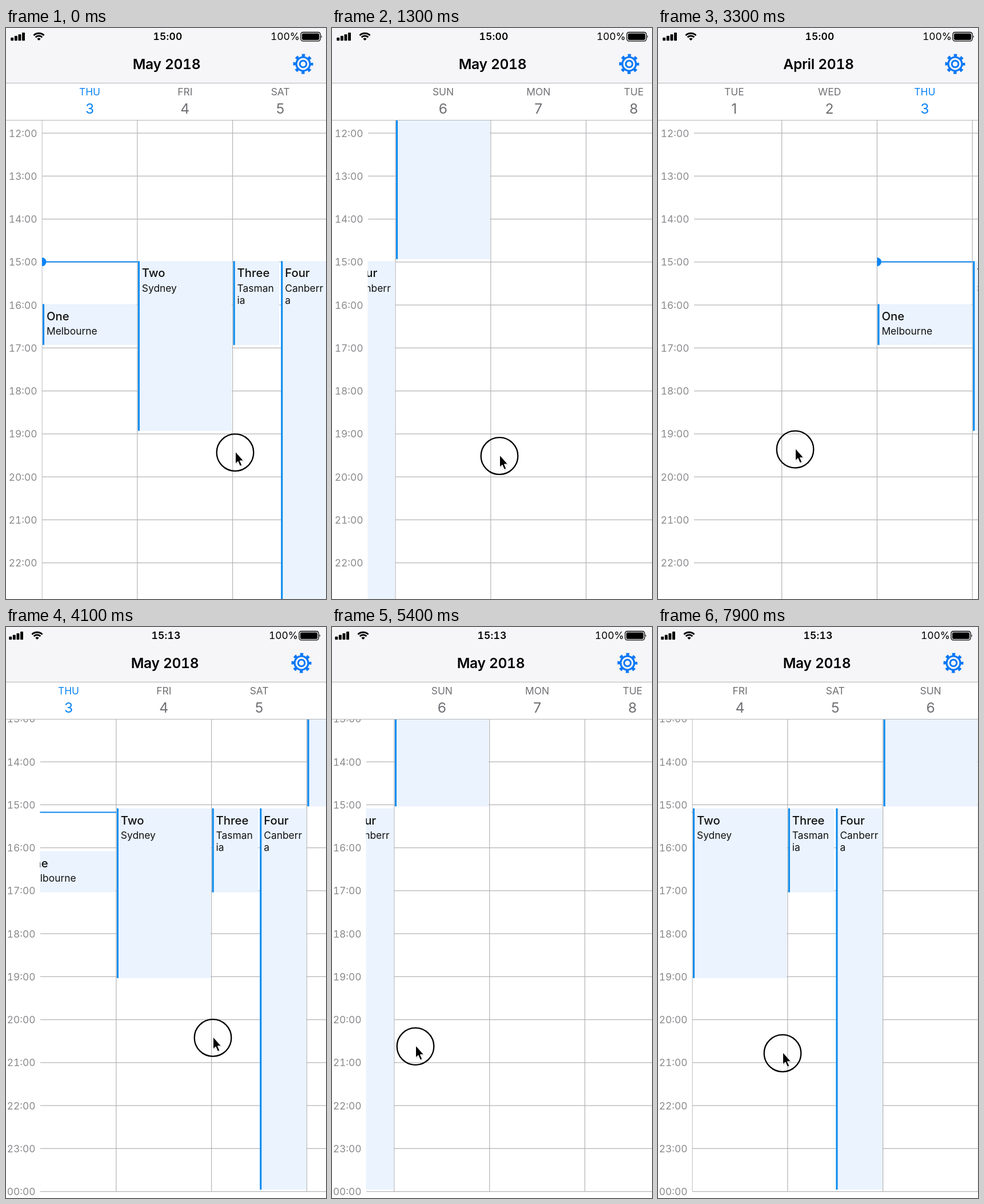
Animation, 560 px wide and 1000 px high, one loop 8 s. Source, as an HTML page:

```html
<!DOCTYPE html>
<html lang="en">
<head>
<meta charset="utf-8">
<title>Week calendar</title>
<style>
  html, body { margin: 0; width: 100%; height: 100%; overflow: hidden; background: #fff; }
  svg { display: block; width: 560px; height: 1000px; font-family: Inter, Roboto, sans-serif; }
  text { font-size: 17.4px; fill: #111; }
  .mid { text-anchor: middle; }
  .hour { text-anchor: end; fill: #8a8a8e; font-variant-numeric: tabular-nums; }
  .status { font-variant-numeric: tabular-nums; fill: #000; }
  #clock { font-weight: 600; letter-spacing: .3px; }
  #month { font-size: 24.6px; font-weight: 600; letter-spacing: -.3px; font-variant-numeric: tabular-nums; fill: #000; }
  .day { fill: #707074; }
  .num { font-size: 24.6px; }
  .day.today { fill: #0a84f5; }
  .name { font-size: 20.3px; font-weight: 500; }
  .rule { stroke: #b4b4b8; stroke-width: 1.2; }
  .card { fill: #eaf3fe; }
  .bar { fill: #0b8bee; }
</style>
</head>
<body>
<svg viewBox="0 0 560 1000">
  <defs>
    <clipPath id="right"><rect x="62.5" y="0" width="510" height="1000"/></clipPath>
  </defs>
  <g id="page">
    <rect width="570" height="1000" fill="#fff"/>
    <g id="hours"></g>
    <g clip-path="url(#right)">
      <g id="columns"></g>
      <g id="events"></g>
      <g id="now">
        <path d="M0 0H167" stroke="#0b84ee" stroke-width="2"/>
        <path d="M0 -7.6A7.6 7.6 0 0 1 0 7.6Z" fill="#0b84f5"/>
      </g>
    </g>
    <rect width="570" height="161.5" fill="#fff"/>
    <g clip-path="url(#right)"><g id="days"></g></g>
    <rect width="570" height="96" fill="#f6f5f7"/>
    <path class="rule" d="M0 96.5H570M0 161.5H570"/>
    <g id="signal"></g>
    <g transform="translate(57.5 22)" fill="none" stroke="#000" stroke-width="2.9">
      <path d="M-9 -9A12.7 12.7 0 0 1 9 -9M-5.8 -5.8A8.2 8.2 0 0 1 5.8 -5.8"/>
      <path d="M0 0L-3.1 -3.1A4.4 4.4 0 0 1 3.1 -3.1Z" fill="#000" stroke="none"/>
    </g>
    <text id="clock" class="status mid" x="283" y="21.4"></text>
    <text class="status" x="463" y="21.4">100%</text>
    <rect x="516" y="7.5" width="34" height="15.4" rx="3.6" fill="none" stroke="#000" stroke-width="1.3"/>
    <rect x="518" y="9.5" width="30" height="11.4" rx="2"/>
    <path d="M551.6 12.6Q554 15.2 551.6 17.8Z"/>
    <text id="month" class="mid" x="281" y="72"></text>
    <g transform="translate(520 63)" fill="none" stroke="#0a78f5">
      <circle r="15" stroke-width="5" stroke-dasharray="5.4 6.381" stroke-dashoffset="2.7"/>
      <circle r="12" stroke-width="3.2"/>
      <circle r="5.8" stroke-width="3"/>
    </g>
  </g>
  <g id="pointer">
    <circle r="32.3" fill="none" stroke="#000" stroke-width="2.3"/>
    <path d="M1.5 0V21L6 17L9.2 25L12.6 23.6L9.4 16L15.5 15.6Z" fill="#000" opacity=".18"/>
    <path d="M.5 -1.5V19.5L5 15.5L8.4 23.6L11.8 22.2L8.4 14.4L14.4 14.2Z" fill="#000" stroke="#fff" stroke-width="1"/>
  </g>
</svg>
<script>
const NS = 'http://www.w3.org/2000/svg';
const LOOP = 8000, TICK = 100, CUT = 3900;
const GUTTER = 63, DAY = 166.8, HOUR = 75.25;
const $ = id => document.getElementById(id);

function add(parent, tag, attrs, text) {
  const node = document.createElementNS(NS, tag);
  for (const key in attrs) node.setAttribute(key, attrs[key]);
  if (text !== undefined) node.textContent = text;
  parent.append(node);
  return node;
}

// Vertical positions count from noon, horizontal ones from Thursday 3 May.
const NAMES = ['SUN', 'MON', 'TUE', 'WED', 'THU', 'FRI', 'SAT'];
for (let i = -4; i <= 8; i++) {
  const mid = i * DAY + 83.5;
  const cls = 'mid day' + (i === 0 ? ' today' : '');
  add($('days'), 'text', { class: cls, x: mid, y: 118.3 }, NAMES[(i + 11) % 7]);
  add($('days'), 'text', { class: cls + ' num', x: mid, y: 150.4 }, i < -2 ? 33 + i : 3 + i);
  add($('columns'), 'path', { class: 'rule', d: `M${i * DAY} -400V${12 * HOUR}` });
}
for (let h = 0; h <= 12; h++) {
  const y = h * HOUR;
  add($('hours'), 'path', { class: 'rule', d: `M${GUTTER} ${y}H570` });
  add($('hours'), 'text', { class: 'hour', x: 54.6, y: y + 6.4 }, `${String((12 + h) % 24).padStart(2, '0')}:00`);
}
for (let i = 0; i < 4; i++) {
  const tall = 5.5 + i * 2.9;
  add($('signal'), 'rect', { x: 8.3 + i * 6.6, y: 22.2 - tall, width: 4.9, height: tall, rx: 1 });
}

function addEvent(x, width, from, height, title, lines) {
  const y = from * HOUR;
  const box = $('events');
  add(box, 'rect', { class: 'card', x, y, width, height });
  add(box, 'rect', { class: 'bar', x, y, width: 3.1, height });
  add(box, 'text', { class: 'name', x: x + 7, y: y + 28 }, title);
  lines.forEach((line, i) => add(box, 'text', { x: x + 7, y: y + 53.4 + i * 21 }, line));
}
addEvent(1, 164.3, 4, 71.6, 'One', ['Melbourne']);
addEvent(DAY + 1, 164.3, 3, 297.2, 'Two', ['Sydney']);
addEvent(2 * DAY + 1, 80.5, 3, 147, 'Three', ['Tasman', 'ia']);
const four = 2 * DAY + 84.6;
addEvent(four, 81.6, 3, 9 * HOUR - 9.5, 'Four', ['Canberr', 'a']);
addEvent(3 * DAY + 1, 164.3, -12, 15 * HOUR - 3.5, 'Four', ['Canberra']);

// time, x, y of the pointer
const PATH = [
  [0, 401, 743.5], [400, 228, 752], [700, 228, 752], [1000, 245, 749],
  [1300, 293, 749.5], [1500, 400, 757], [1700, 400, 758], [2000, 265, 757],
  [2300, 393.5, 761.5], [2400, 432, 763], [2900, 420, 750], [3300, 240, 738],
  [3500, 235, 736], [3900, 396, 718], [4000, 396, 718], [4100, 362, 719.5],
  [4600, 146, 734], [5400, 146, 734.5], [6200, 155, 737], [6600, 315.5, 736],
  [6800, 385, 736], [7100, 385, 738], [7600, 228, 746], [7700, 228, 746], [7900, 218, 746.5]
];
// grab, release, rest, days scrolled at rest
const SWIPES = [
  [0, 400, 850, 3], [1000, 1500, 1900, 0], [2000, 2400, 2800, -3], [2900, 3300, 3800, 0],
  [4000, 4600, 5400, 2.707], [5400, 5400, 5600, 3], [6200, 6800, 7600, 1]
];

const clamp = v => Math.min(1, Math.max(0, v));
const easeOut = p => 1 - (1 - p) ** 3;

function pointerAt(t) {
  const i = Math.max(1, PATH.findIndex(p => p[0] >= t));
  const a = PATH[i - 1], b = PATH[i];
  const p = clamp((t - a[0]) / (b[0] - a[0]));
  return [a[1] + (b[1] - a[1]) * p, a[2] + (b[2] - a[2]) * p];
}

function scrollAt(t) {
  let s = 0;
  for (const [grab, drop, rest, days] of SWIPES) {
    if (t < grab) break;
    s -= pointerAt(Math.min(t, drop))[0] - pointerAt(grab)[0];
    s += (days * DAY - s) * easeOut(clamp((t - drop) / (rest - drop)));
  }
  return s;
}

function move(id, x, y) {
  $(id).setAttribute('transform', `translate(${x.toFixed(2)} ${y.toFixed(2)})`);
}

function draw(t) {
  const late = t >= CUT;
  const noon = late ? 85.7 : 184.2;
  const left = GUTTER - scrollAt(t);
  move('page', late ? -3 : 0, 0);
  move('hours', 0, noon);
  move('columns', left, noon);
  move('events', left, noon + (late ? 6.2 : -1.7));
  move('now', left, late ? 324.5 : 409.6);
  move('days', left, 0);
  move('pointer', ...pointerAt(t));
  $('clock').textContent = late ? '15:13' : '15:00';
  $('month').textContent = t >= 2800 && t < 3800 ? 'April 2018' : 'May 2018';
}

const start = performance.now();
function frame() {
  const t = (performance.now() - start) % LOOP;
  draw(Math.floor(t / TICK) * TICK);
  requestAnimationFrame(frame);
}
frame();
</script>
</body>
</html>
```
